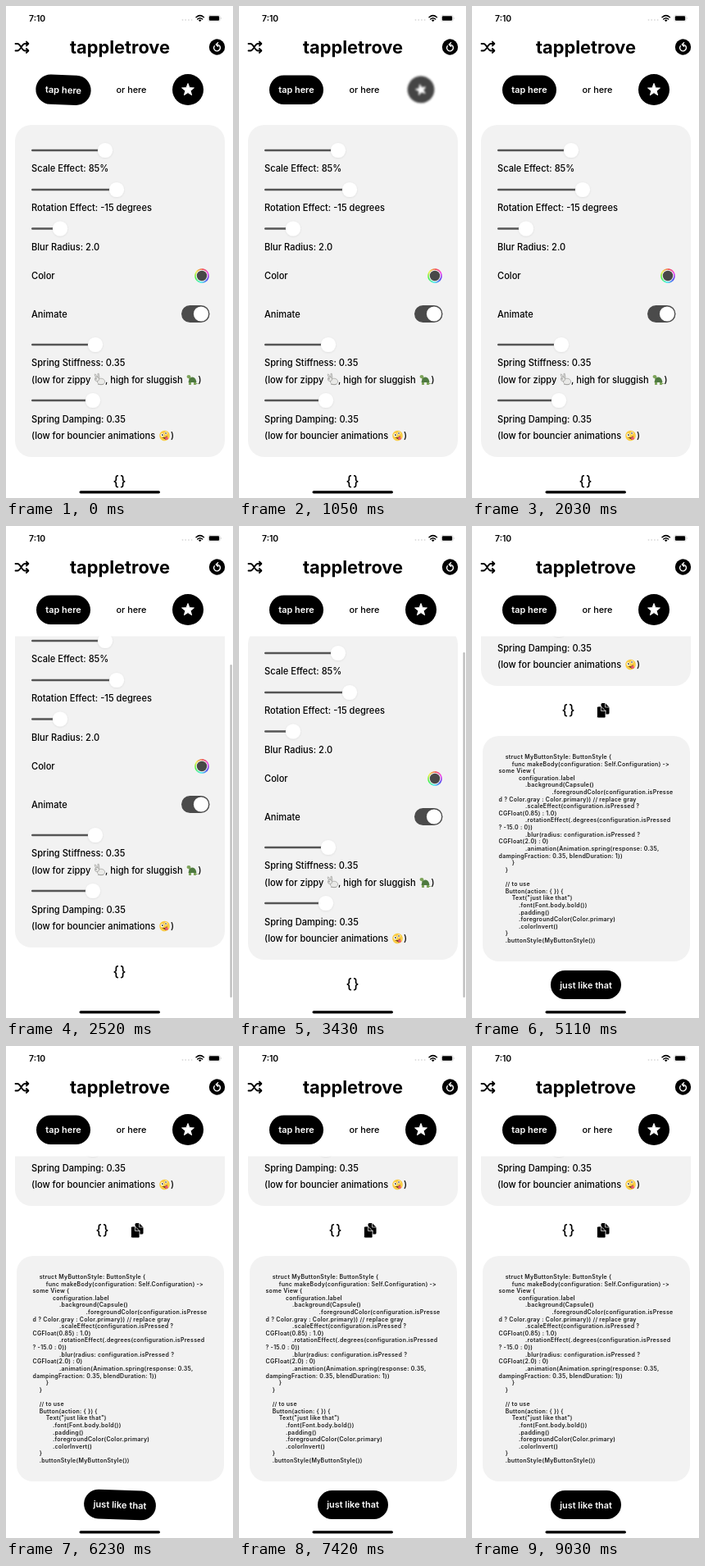
An HTML page that plays this animation: 277x600 px, repeating every 9100 ms.

```html
<!DOCTYPE html>
<html lang="en">
<head>
<meta charset="utf-8">
<title>Button style playground</title>
<style>
  html, body { margin: 0; width: 100%; height: 100%; overflow: hidden; background: #fff; }
  svg { display: block; width: 277px; height: 600px; font: 500 11.1px Inter, sans-serif; }
  .semi { font-weight: 600; font-size: 10.9px; }
  .center { text-anchor: middle; }
  .code { font-size: 7px; font-weight: 600; letter-spacing: .27px; white-space: pre; fill: #1c1c1c; }
  .button { transform-box: fill-box; transform-origin: center; }
  .line { fill: none; stroke: #000; stroke-linecap: round; stroke-linejoin: round; }
</style>
</head>
<body>
<svg viewBox="0 0 277 600">
  <defs>
    <filter id="shadow" x="-50%" y="-50%" width="200%" height="200%">
      <feDropShadow dx="0" dy=".6" stdDeviation="1.1" flood-opacity=".1"/>
    </filter>
  </defs>

  <g id="content">
    <rect x="11" y="145" width="256" height="405" rx="20" fill="#f2f2f2"/>
    <g id="sliders"></g>
    <text x="31" y="202">Scale Effect: 85%</text>
    <text x="31" y="250">Rotation Effect: -15 degrees</text>
    <text x="31" y="298">Blur Radius: 2.0</text>
    <text x="31" y="333">Color</text>
    <g id="well" fill="none" stroke-width="1.7"></g>
    <circle cx="239" cy="329" r="6.2" fill="#484848"/>
    <text x="31" y="380">Animate</text>
    <rect x="214" y="365" width="34.5" height="21" rx="10.5" fill="#4b4b4b"/>
    <circle cx="238" cy="375.5" r="9.1" fill="#fff"/>
    <text x="31" y="439">Spring Stiffness: 0.35</text>
    <text x="31" y="459.5">(low for zippy</text>
    <text x="121" y="459.5">, high for sluggish</text>
    <text x="234.5" y="459.5">)</text>
    <text x="31" y="507.5">Spring Damping: 0.35</text>
    <text x="31" y="528">(low for bouncier animations</text>
    <text x="201" y="528">)</text>

    <!-- rabbit -->
    <g fill="#e9e9e7" stroke="#8f8f8c" stroke-width=".6">
      <path d="M110 454l-2-4.500 1-.7 3 4 0-4.500 1.200 0 .8 5z"/>
      <ellipse cx="116" cy="458" rx="4.6" ry="3.8"/>
      <circle cx="111" cy="455" r="2.6"/>
      <path d="M112 461.500h7"/>
    </g>
    <circle cx="110" cy="454.7" r=".5"/>
    <!-- turtle -->
    <g fill="#7da35a">
      <path d="M226 456l-1-3q-2.500 0-2.500-2t2.500-2 2.500 3z" transform="translate(-2 1)"/>
      <path d="M223 458h3v4h-3zM229 458h3v4h-3zM231 459l4 2-4 0z"/>
    </g>
    <path d="M222.500 459q1-6.500 5-6.500t5 6.500z" fill="#4f7a40"/>
    <!-- zany face -->
    <g transform="translate(193.5 524) rotate(-15)">
      <circle r="6.3" fill="#f9cc45"/>
      <circle cx="-2.5" cy="-1.5" r="2" fill="#fff"/>
      <circle cx="2.3" cy="-2.5" r="1.6" fill="#fff"/>
      <circle cx="-2.3" cy="-1.5" r=".8"/>
      <circle cx="2.3" cy="-2.5" r=".7"/>
      <path d="M-3.500 1.500q3.500 1 6.500-.5q.5 4-3 4z" fill="#6b3b1d"/>
      <path d="M-.5 3l3-1.500 1 3q-2 2-3.500 0z" fill="#ee5a72"/>
    </g>

    <text id="braces" class="center" y="585" style="font-size:17px;letter-spacing:1px">{}</text>

    <g id="snippet">
      <g transform="translate(160 580)">
        <path d="M-2.500-7.500q0-1.500 1.500-1.500h3.500l5 5v7q0 1.500-1.500 1.500h-8.500z"/>
        <path d="M-7.500-3.500q0-1.500 1.500-1.500h3.500l5.500 5.500v7q0 1.500-1.500 1.500h-7.500q-1.500 0-1.500-1.500z" stroke="#fff" stroke-width=".8"/>
        <path d="M2.500-9v5h5M-2.500-5v5.500h5.500" class="line" style="stroke:#fff;stroke-width:.7"/>
      </g>
      <rect id="panel" x="13" y="611" width="253" height="275" rx="20" fill="#f2f2f2"/>
      <g id="code"></g>
      <g id="demo" class="button">
        <rect x="96" y="897" width="86" height="35" rx="17.5"/>
        <text x="139" y="918.5" class="semi center" fill="#fff">just like that</text>
      </g>
    </g>
  </g>

  <rect width="277" height="134.5" fill="#fff"/>
  <rect id="scrollbar" x="273.5" width="2.2" rx="1.1" fill="#b9b9b9"/>

  <text x="28" y="19" style="font-size:10.4px;font-weight:600">7:10</text>
  <g fill="#dcdcdc">
    <circle cx="215.5" cy="17" r=".9"/><circle cx="219.2" cy="17" r=".9"/>
    <circle cx="222.9" cy="17" r=".9"/><circle cx="226.6" cy="17" r=".9"/>
  </g>
  <path d="M232 13.700q4.700-4.200 9.400 0M233.700 16q3-2.600 6 0" class="line" stroke-width="1.5"/>
  <path d="M234.900 17.300q1.800-1.500 3.600 0l-1.800 2z"/>
  <rect x="246.7" y="11.2" width="14.6" height="7.6" rx="2.2" class="line" style="stroke:#ccc;stroke-width:.6"/>
  <rect x="247.8" y="12.3" width="12.4" height="5.4" rx="1.3"/>
  <path d="M262.200 13.500q1.400 1.500 0 3z" fill="#bbb"/>

  <g class="line" stroke-width="1.8">
    <path d="M11.500 46h2.500c4 0 5 8.500 9 8.500h4M11.500 54.500h2.500c4 0 5-8.500 9-8.500h4"/>
    <path d="M24.800 43.500l2.600 2.500-2.600 2.500M24.800 52l2.600 2.500-2.600 2.500"/>
  </g>
  <text x="139" y="58" class="center" style="font-size:21.8px;font-weight:700">tappletrove</text>
  <circle cx="257.5" cy="50" r="9.7"/>
  <path d="M254.300 48.800a3.900 3.900 0 1 0 3.200-1.700M258.600 44.800l-2.300 2.300 2.300 2.200" class="line" style="stroke:#fff;stroke-width:1.4"/>

  <g id="tap" class="button">
    <rect x="37" y="84.5" width="66" height="35.5" rx="17.7"/>
    <text x="70" y="106.3" class="semi center" fill="#fff">tap here</text>
  </g>
  <text x="153" y="106.3" class="center" style="font-size:10.9px">or here</text>
  <g id="star" class="button">
    <circle cx="222" cy="102" r="19"/>
    <path id="starShape" fill="#fff" stroke="#fff" stroke-linejoin="round"/>
  </g>
  <rect x="89.5" y="591.2" width="98.5" height="3.2" rx="1.6"/>
</svg>

<script>
const LOOP = 9100, STEP = 70;
const $ = id => document.getElementById(id);
const clamp = x => Math.min(1, Math.max(0, x));
const ramp = (t, from, to) => clamp((t - from) / (to - from));
const easeInOut = x => x < .5 ? 4 * x ** 3 : 1 - (2 - 2 * x) ** 3 / 2;
const easeOut = x => 1 - (1 - x) ** 3;

$('sliders').innerHTML = [[121, 176], [135, 224], [66, 271.5], [109, 413], [106, 481]].map(([x, y]) => `
  <rect class="rest" x="31" y="${y - 1.3}" width="215" height="2.6" rx="1.3" fill="#dedede"/>
  <rect x="31" y="${y - 1.3}" width="${x - 31}" height="2.6" rx="1.3" fill="#555"/>
  <circle cx="${x}" cy="${y}" r="9.1" fill="#fff" filter="url(#shadow)"/>`).join('');
const restTracks = document.querySelectorAll('.rest');

$('well').innerHTML = Array.from({ length: 24 }, (_, i) => {
  const point = k => `${239 + 8 * Math.cos(k * Math.PI / 12)} ${329 + 8 * Math.sin(k * Math.PI / 12)}`;
  return `<path d="M${point(i)}A8 8 0 0 1 ${point(i + 1.1)}" stroke="hsl(${270 - i * 15} 85% 62%)"/>`;
}).join('');

$('starShape').setAttribute('d', 'M' + Array.from({ length: 10 }, (_, i) => {
  const r = i % 2 ? 3.3 : 7.8, a = i * Math.PI / 5;
  return `${222 + r * Math.sin(a)} ${102.3 - r * Math.cos(a)}`;
}).join('L') + 'Z');

const source = `    struct MyButtonStyle: ButtonStyle {
        func makeBody(configuration: Self.Configuration) ->
some View {
            configuration.label
                .background(Capsule()
                                .foregroundColor(configuration.isPresse
d ? Color.gray : Color.primary)) // replace gray
                .scaleEffect(configuration.isPressed ?
CGFloat(0.85) : 1.0)
                .rotationEffect(.degrees(configuration.isPressed
? -15.0 : 0))
                .blur(radius: configuration.isPressed ?
CGFloat(2.0) : 0)
                .animation(Animation.spring(response: 0.35,
dampingFraction: 0.35, blendDuration: 1))
        }
    }

    // to use
    Button(action: { }) {
        Text("just like that")
            .font(Font.body.bold())
            .padding()
            .foregroundColor(Color.primary)
            .colorInvert()
    }
    .buttonStyle(MyButtonStyle())`;
source.split('\n').forEach((line, i) => {
  const text = document.createElementNS('http://www.w3.org/2000/svg', 'text');
  text.setAttribute('class', 'code');
  text.setAttribute('x', 32.5);
  text.setAttribute('y', 638.9 + i * 8.62);
  text.textContent = line;
  $('code').append(text);
});

// Underdamped spring from 0 to 1: response 0.35 s, damping fraction 0.35.
function spring(ms) {
  if (ms <= 0) return 0;
  const s = ms / 1000, damping = .35, omega = 2 * Math.PI / .35;
  const root = Math.sqrt(1 - damping ** 2), angle = omega * root * s;
  return 1 - Math.exp(-damping * omega * s) * (Math.cos(angle) + damping / root * Math.sin(angle));
}

function press(id, t, down, up) {
  const p = spring(t - down) - spring(t - up), el = $(id);
  el.style.transform = `rotate(${-15 * p}deg) scale(${1 - .15 * p})`;
  el.style.filter = p > .03 ? `blur(${1.3 * p}px)` : 'none';
  const shade = Math.round(75 * clamp(p));
  el.firstElementChild.setAttribute('fill', `rgb(${shade},${shade},${shade})`);
}

const OPEN = 4080;

function scrollAt(t) {
  if (t < 2560) return 36 * easeInOut(ramp(t, 2100, 2500));
  if (t < OPEN) return 36 - 15 * easeOut(ramp(t, 2560, 2990));
  return 21 + 334 * easeInOut(ramp(t, OPEN, OPEN + 316));
}

function drawScrollbar(t, scroll) {
  const view = 441, limit = t < OPEN ? 21 : 355, height = view + limit;
  const over = Math.max(0, scroll - limit);
  const bar = $('scrollbar');
  bar.setAttribute('y', 134 + view * Math.min(scroll, limit) / height + over);
  bar.setAttribute('height', view * view / height - over);
  bar.setAttribute('opacity', ramp(t, 2080, 2200) * (1 - ramp(t, 4850, 5100)));
}

function draw(t) {
  const scroll = scrollAt(t);
  $('content').setAttribute('transform', `translate(0 ${-scroll})`);
  drawScrollbar(t, scroll);
  $('braces').setAttribute('x', 139 - 21 * spring(t - OPEN));
  $('snippet').setAttribute('opacity', ramp(t, OPEN, OPEN + 300));
  $('panel').setAttribute('opacity', ramp(t, OPEN + 200, OPEN + 400));
  restTracks.forEach(track => track.setAttribute('opacity', ramp(t, OPEN - 100, OPEN + 100)));
  press('tap', t, -2000, -260);
  press('star', t, 700, 1050);
  press('demo', t, 5500, 5970);
}

const start = performance.now();
function tick() {
  const t = (performance.now() - start) % LOOP;
  draw(Math.floor(t / STEP) * STEP);
  requestAnimationFrame(tick);
}
tick();
</script>
</body>
</html>
```
